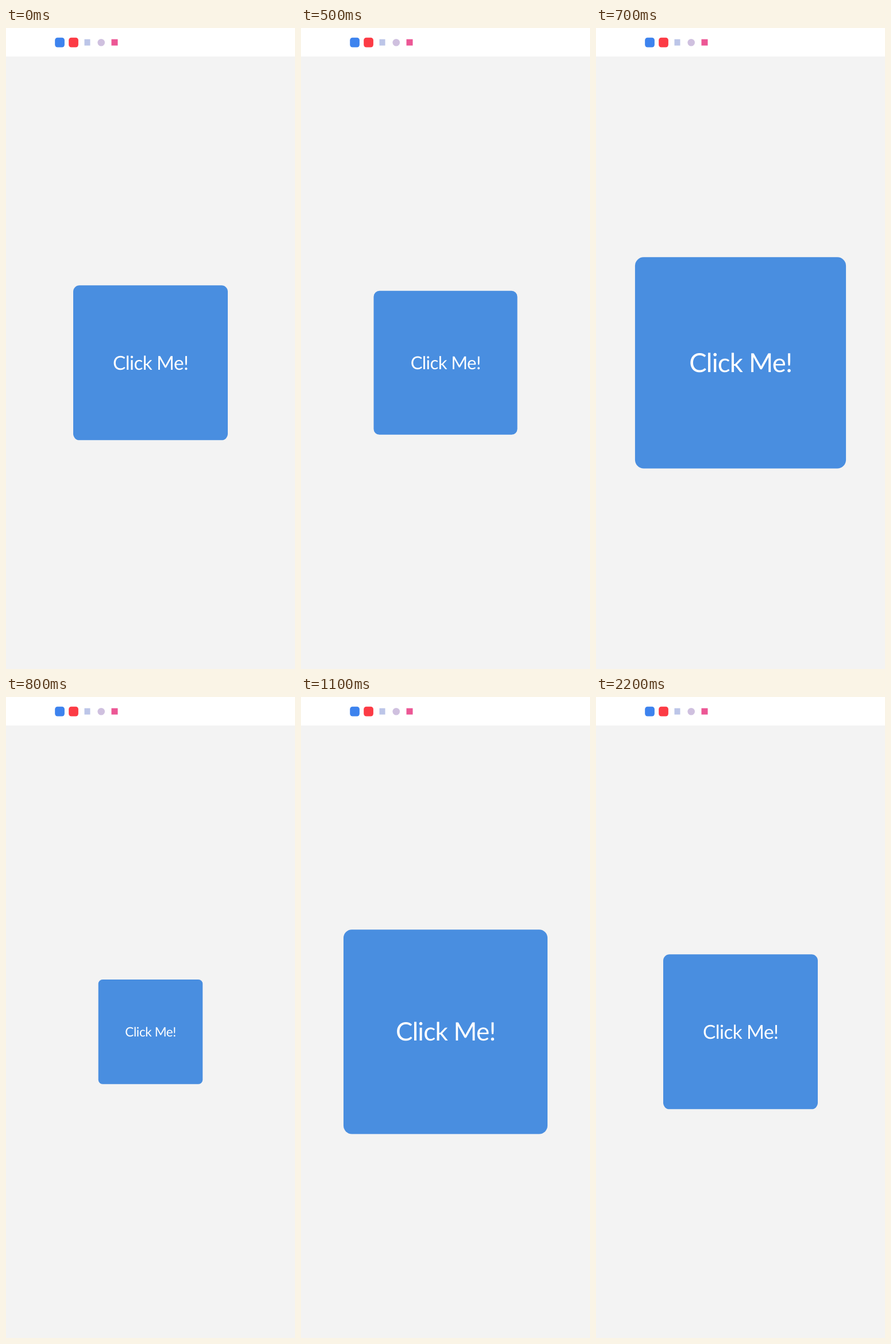
Recreate the animation shown at these times as an HTML page. Size 503 by 1114 pixels, loop 2300 ms.

```html
<!DOCTYPE html>
<html lang="en">
<head>
<meta charset="utf-8">
<title>Spring button</title>
<style>
  html, body { margin: 0; height: 100%; overflow: hidden; background: #f3f3f3; }
  svg { display: block; width: 503px; height: 1114px; }
  text {
    font: 33.4px Lato, sans-serif; letter-spacing: -.6px;
    text-anchor: middle; text-rendering: geometricPrecision;
  }
</style>
</head>
<body>
<svg viewBox="0 0 503 1114">
  <defs>
    <radialGradient id="glow">
      <stop offset=".6" stop-color="#fff" stop-opacity=".16"/>
      <stop offset="1" stop-color="#fff" stop-opacity="0"/>
    </radialGradient>
  </defs>
  <rect width="503" height="1114" fill="#f3f3f3"/>
  <rect width="503" height="49.5" fill="#fff"/>

  <rect x="85.2" y="16.8" width="16.7" height="16.7" rx="4.5" fill="#3d83ee"/>
  <rect x="109.2" y="16.8" width="16.7" height="16.7" rx="4.5" fill="#fc3b45"/>
  <rect x="136.5" y="19.5" width="10" height="11" fill="#bcc5e8"/>
  <circle cx="165.7" cy="25.2" r="6.3" fill="#cfc0df"/>
  <rect x="183.5" y="19.5" width="11" height="11" fill="#ec5795"/>

  <g id="button">
    <rect x="-134.5" y="-134.5" width="269" height="269" rx="11" fill="#498ee0"/>
    <text x=".2" y="11.8" fill="#fff">Click Me!</text>
  </g>

  <g id="touch" transform="translate(223 597)">
    <circle r="24" fill="url(#glow)"/>
    <circle r="14" fill="#fff" fill-opacity=".46"/>
    <circle r="14.6" fill="none" stroke="#a9bbd6" stroke-opacity=".5" stroke-width="2"/>
  </g>
</svg>
<script>
  const LOOP = 2300, STEP = 100;
  // Turning points of the spring: [ms, scale]
  const spring = [[220, 1], [410, .28], [610, 1.82], [820, .649], [1080, 1.343], [1200, 1]];
  const button = document.getElementById('button');
  const touch = document.getElementById('touch');
  const ease = u => (1 - Math.cos(Math.PI * u)) / 2;

  function scaleAt(t) {
    const next = spring.findIndex(([time]) => time > t);
    if (next < 1) return 1;
    const [t0, s0] = spring[next - 1], [t1, s1] = spring[next];
    return s0 + (s1 - s0) * ease((t - t0) / (t1 - t0));
  }

  function draw() {
    const t = Math.floor(performance.now() % LOOP / STEP) * STEP;
    button.setAttribute('transform', `translate(251.5 581.85) scale(${scaleAt(t)})`);
    touch.style.display = t >= 300 && t < 500 ? '' : 'none';
    requestAnimationFrame(draw);
  }
  draw();
</script>
</body>
</html>
```
